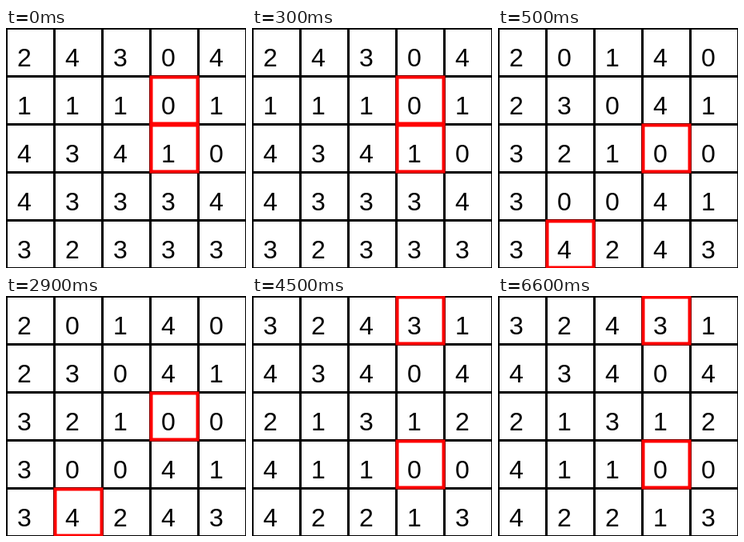
An HTML page that plays this animation: 300x300 px, repeating every 8 s.

```html
<!DOCTYPE html>
<html lang="en">
<head>
<meta charset="utf-8">
<title>Number grid</title>
<style>
  html, body { margin: 0; width: 100%; height: 100%; overflow: hidden; background: #fff; }
  svg { display: block; width: 100vw; height: 100vh; }
  text { font: 32px "Liberation Sans", Arial, sans-serif; }
</style>
</head>
<body>
<svg id="stage" viewBox="0 0 300 300"></svg>
<script>
const CELL = 60, SIZE = 5, LOOP = 8000;

// Each state: start time, digits by row, marked cells as [column, row].
const states = [
  { at: 0, rows: ["24304", "11101", "43410", "43334", "32333"], marks: [[3, 1], [3, 2]] },
  { at: 500, rows: ["20140", "23041", "32100", "30041", "34243"], marks: [[3, 2], [1, 4]] },
  { at: 4500, rows: ["32431", "43404", "21312", "41100", "42213"], marks: [[3, 0], [3, 3]] }
];

const stage = document.getElementById("stage");

function add(tag, attrs) {
  const node = document.createElementNS("http://www.w3.org/2000/svg", tag);
  for (const key in attrs) node.setAttribute(key, attrs[key]);
  return stage.appendChild(node);
}

add("rect", { width: 300, height: 300, fill: "#fff" });
for (let i = 0; i <= SIZE; i++) {
  const p = i * CELL - 1;
  add("rect", { x: p, y: 0, width: 3, height: 300 });
  add("rect", { x: 0, y: p, width: 300, height: 3 });
}

const digits = Array.from({ length: SIZE * SIZE }, (_, i) =>
  add("text", { x: (i % SIZE) * CELL + 14, y: Math.floor(i / SIZE) * CELL + 48 }));
const boxes = [0, 1].map(() =>
  add("rect", { width: 58, height: 58, fill: "none", stroke: "#f00", "stroke-width": 4 }));

let shown;
function draw(time) {
  const state = states.findLast(s => s.at <= time % LOOP);
  if (state === shown) return;
  shown = state;
  digits.forEach((node, i) => { node.textContent = state.rows[Math.floor(i / SIZE)][i % SIZE]; });
  boxes.forEach((node, i) => {
    const [col, row] = state.marks[i];
    node.setAttribute("x", col * CELL + 1.5);
    node.setAttribute("y", row * CELL + 1.5);
  });
}

const start = performance.now();
function tick() {
  draw(performance.now() - start);
  requestAnimationFrame(tick);
}
tick();
</script>
</body>
</html>
```
